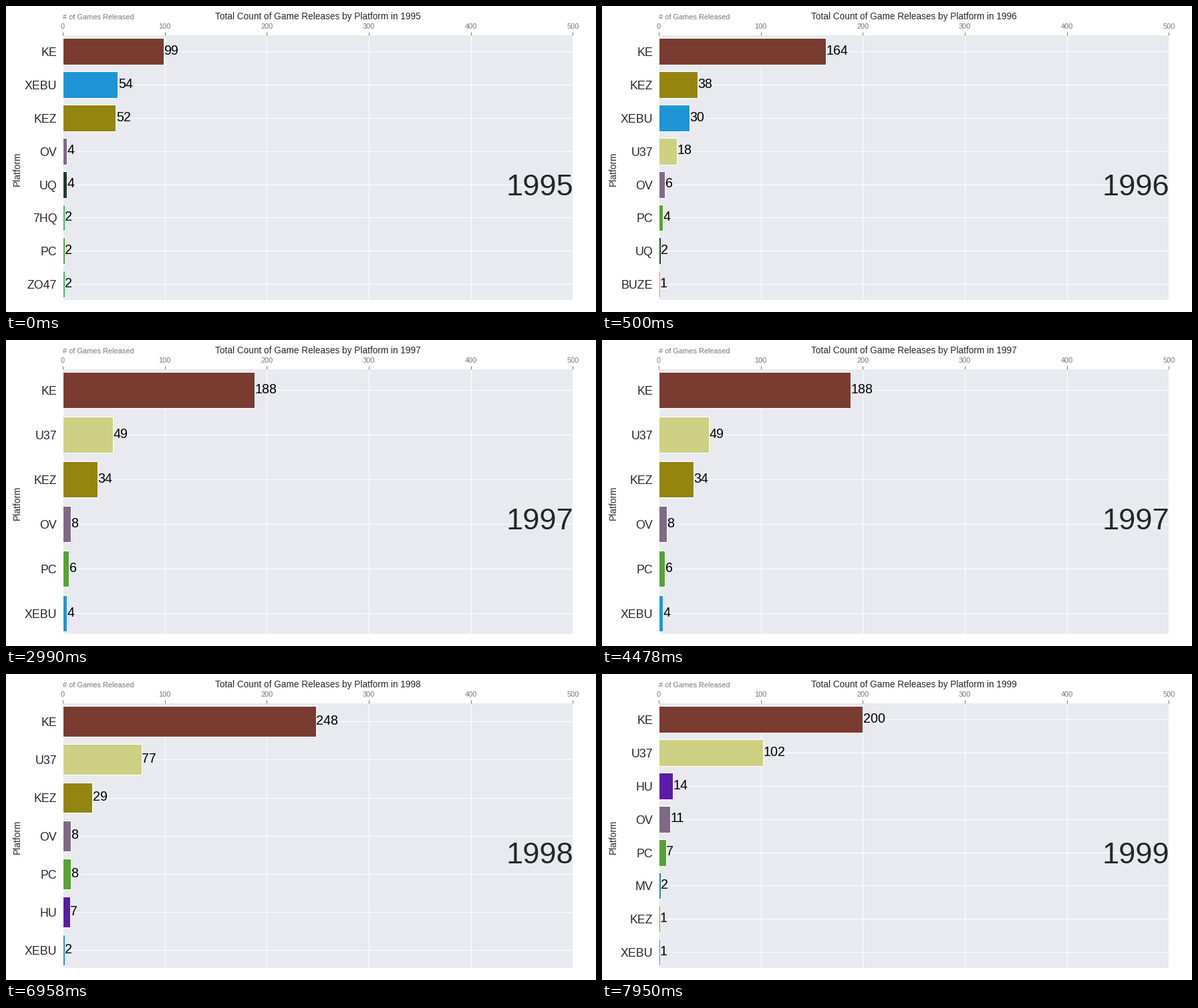
Recreate the animation shown at these times as a matplotlib script. Size 883x459 px, loop 8 s.

```python
import matplotlib.pyplot as plt
from matplotlib.animation import FuncAnimation
from matplotlib.patches import Rectangle

W, H, DPI = 883, 459, 64
PT = 72 / DPI  # points per pixel
LEFT, RIGHT, TOP, BOTTOM = 85.0, 848.4, 44.4, 441
X_MAX = 500
INTERVAL, LOOP = 10, 8000
DARK, GREY = "#262626", "#777777"

COLORS = {
    "KE": "#7a3b30", "XEBU": "#1f95d8", "KEZ": "#938510", "OV": "#7f6a85",
    "UQ": "#253a2a", "7HQ": "#39b868", "PC": "#55a335", "ZO47": "#39b868",
    "U37": "#cdd082", "BUZE": "#d0808f", "HU": "#5a1ca8", "MV": "#2f7f80",
}

# start time in ms, year, releases per platform
YEARS = [
    (0, 1995, {"KE": 99, "XEBU": 54, "KEZ": 52, "OV": 4,
               "UQ": 4, "7HQ": 2, "PC": 2, "ZO47": 2}),
    (500, 1996, {"KE": 164, "KEZ": 38, "XEBU": 30, "U37": 18,
                 "OV": 6, "PC": 4, "UQ": 2, "BUZE": 1}),
    (2990, 1997, {"KE": 188, "U37": 49, "KEZ": 34, "OV": 8,
                  "PC": 6, "XEBU": 4}),
    (5470, 1998, {"KE": 248, "U37": 77, "KEZ": 29, "OV": 8,
                  "PC": 8, "HU": 7, "XEBU": 2}),
    (7950, 1999, {"KE": 200, "U37": 102, "HU": 14, "OV": 11,
                  "PC": 7, "MV": 2, "KEZ": 1, "XEBU": 1}),
]

plt.rcParams["font.family"] = "Liberation Sans"
fig = plt.figure(figsize=(W / DPI, H / DPI), dpi=DPI, facecolor="white")
ax = fig.add_axes([0, 0, 1, 1])
ax.set_xlim(0, W)
ax.set_ylim(H, 0)
ax.axis("off")


def x_pos(value):
    return LEFT + (RIGHT - LEFT) * value / X_MAX


def label(x, y, text, size, color=DARK, **kw):
    return ax.text(x, y, text, fontsize=size * PT, color=color, **kw)


def line(xs, ys, color="white", zorder=1):
    return ax.plot(xs, ys, color=color, lw=PT, zorder=zorder,
                   solid_capstyle="butt")[0]


def draw_frame():
    ax.add_patch(Rectangle((LEFT, TOP), RIGHT - LEFT, BOTTOM - TOP,
                           fc="#e9eaf0", lw=0, zorder=0))
    for value in range(0, X_MAX + 1, 100):
        x = x_pos(value)
        line([x, x], [TOP, BOTTOM])
        line([x, x], [TOP - 5, TOP], GREY)
        label(x, 34.5, str(value), 11, GREY, ha="center")
    label(LEFT, 20.3, "# of Games Released", 11, GREY)
    label(21, 244.5, "Platform", 13.8, ha="center", va="baseline",
          rotation=90, rotation_mode="anchor")


def draw_year(year, counts):
    """Draw one ranked chart and return its artists."""
    span = len(counts) - 0.2
    step = (BOTTOM - TOP) / (span * 1.02)
    first = TOP + (0.4 + 0.01 * span) * step
    parts = [
        label((LEFT + RIGHT) / 2, 20.3,
              f"Total Count of Game Releases by Platform in {year}",
              13.65, ha="center"),
        label(RIGHT + 0.4, 283.6, str(year), 45.3, ha="right"),
    ]
    for rank, (name, count) in enumerate(counts.items()):
        y = first + rank * step
        bar = Rectangle((LEFT, y - 0.4 * step), x_pos(count) - LEFT,
                        0.8 * step, fc=COLORS[name], ec="white",
                        lw=PT, zorder=2)
        parts += [
            ax.add_patch(bar),
            line([LEFT, RIGHT], [y, y]),
            label(LEFT - 8.7, y + 0.4, name, 17.7,
                  ha="right", va="center_baseline"),
            label(x_pos(count) + 0.4, y - 0.8, str(count), 19.6, "black",
                  va="center"),
        ]
    return parts


draw_frame()
charts = [(start, draw_year(year, counts)) for start, year, counts in YEARS]


def update(i):
    now = i * INTERVAL
    current = max(start for start, _ in charts if start <= now)
    for start, parts in charts:
        for part in parts:
            part.set_visible(start == current)
    return []


anim = FuncAnimation(fig, update, frames=LOOP // INTERVAL, interval=INTERVAL,
                     init_func=lambda: update(0), repeat=True, repeat_delay=0)
plt.show()
```
